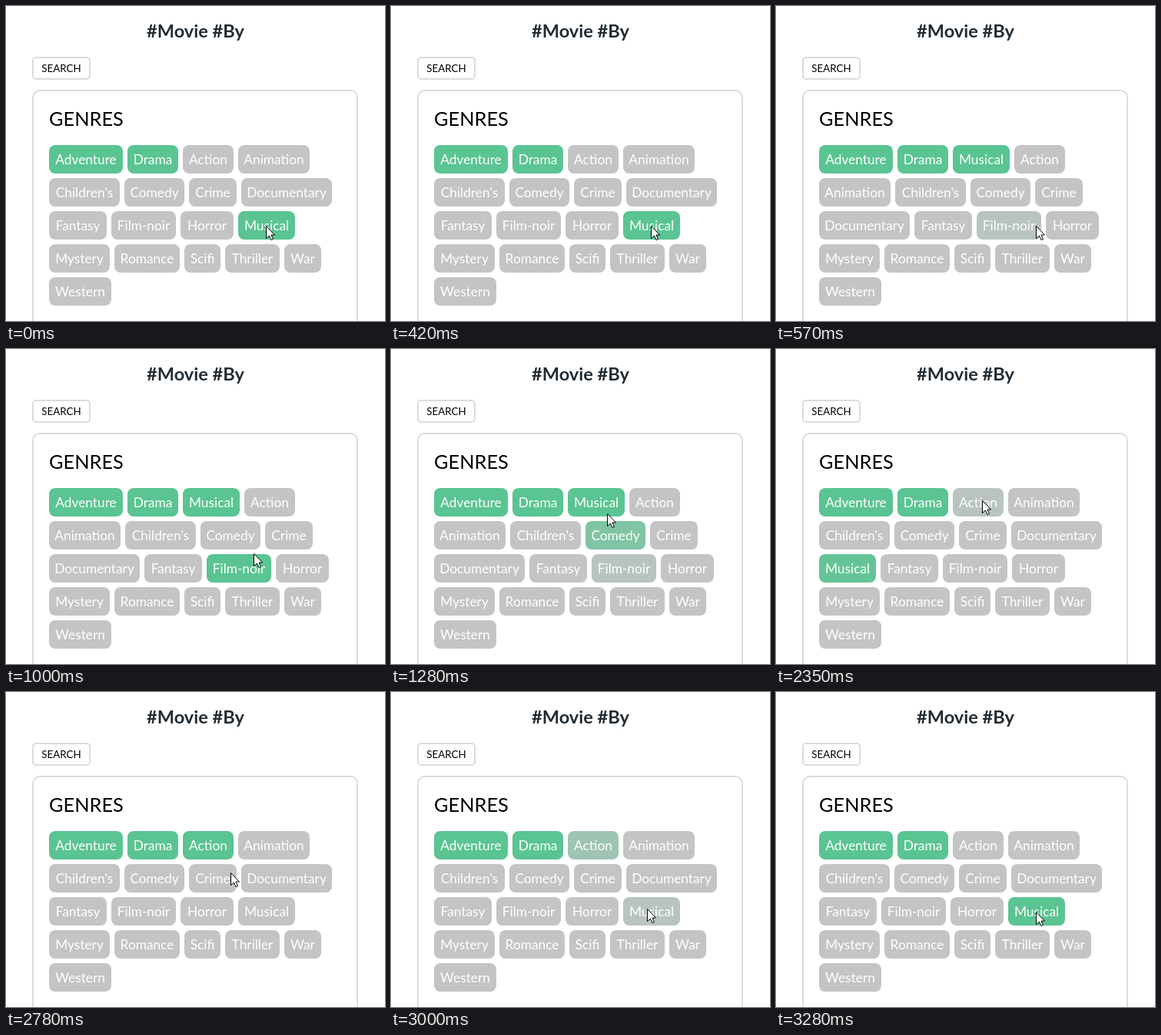
An HTML page with a canvas that plays this animation: 493 px wide and 410 px high, repeating every 3360 ms.

```html
<!DOCTYPE html>
<html lang="en">
<head>
<meta charset="utf-8">
<title>Genre picker</title>
<style>
  html, body { margin: 0; width: 100%; height: 100%; overflow: hidden; background: #fff; }
  canvas { display: block; }
</style>
</head>
<body>
<canvas id="stage" width="493" height="410"></canvas>
<script>
const ctx = document.getElementById('stage').getContext('2d');
const LOOP = 3360, TICKS = 47, STEP = 71.5;
const FAMILY = 'Lato, "Open Sans", sans-serif';
const GREY = [196, 196, 196], GREEN = [90, 196, 146];
const PAD = 8, GAP = 6, LEFT = 56, RIGHT = 437, TOP = 181, HEIGHT = 37;
const FADE = 0.2; // share of the hover fade per tick

// Ticks at which Musical is picked, dropped, and sorted back into place.
const PICK = 8, DROP = 33, SORT = 34;
const CLICKS = [5, 28];
const HOME = [338, 286], AWAY = [268, 197];

// Chip widths by label, in alphabetical order after the chosen ones.
const WIDTH = {
  Adventure: 96, Drama: 66,
  Action: 66, Animation: 93, "Children's": 92, Comedy: 78, Crime: 62, Documentary: 118,
  Fantasy: 75, 'Film-noir': 84, Horror: 69, Musical: 74, Mystery: 79, Romance: 85,
  Scifi: 47, Thriller: 71, War: 48, Western: 81
};
const NAMES = Object.keys(WIDTH);

const clamp = v => Math.min(1, Math.max(0, v));
const smooth = v => v * v * (3 - 2 * v);
const font = (size, weight = 400) => `${weight} ${size}px ${FAMILY}`;

// Font size at which the labels together take the given width.
function fitSize(labels, width, weight) {
  ctx.font = font(100, weight);
  return 100 * width / labels.reduce((sum, s) => sum + ctx.measureText(s).width, 0);
}

const chipSize = fitSize(NAMES,
  NAMES.reduce((sum, name) => sum + WIDTH[name] - 2 * PAD, 0));
const titleSize = fitSize(['#Movie #By'], 127, 700);
const headSize = fitSize(['GENRES'], 96.8);

// Eased move between two points, bowed sideways.
function glide([x0, y0], [x1, y1], progress, bow) {
  const e = smooth(clamp(progress)), b = bow * e * (1 - e);
  const dx = x1 - x0, dy = y1 - y0;
  return [Math.round(x0 + dx * e - dy * b), Math.round(y0 + dy * e + dx * b)];
}

function pointerAt(k) {
  return k < 30 ? glide(HOME, AWAY, (k - 11) / 9.7, 0)
                : glide(AWAY, HOME, (k - 36) / 7, 0.15);
}

const isChosen = (name, k) =>
  name === 'Adventure' || name === 'Drama' ||
  (name === 'Musical' && k >= PICK && k < DROP);

function order(k) {
  const names = NAMES.filter(n => isChosen(n, k))
    .concat(NAMES.filter(n => !isChosen(n, k)));
  if (k >= DROP && k < SORT) {
    names.splice(names.indexOf('Musical'), 1);
    names.splice(names.indexOf('Fantasy'), 0, 'Musical');
  }
  return names;
}

function layout(k) {
  let x = LEFT, y = TOP;
  return order(k).map(name => {
    const w = WIDTH[name];
    if (x + w > RIGHT) {
      x = LEFT;
      y += HEIGHT + GAP;
    }
    const chip = { name, x, y, w };
    x += w + GAP;
    return chip;
  });
}

// Hover follows the pointer one tick late and fades in and out.
function buildTicks() {
  const fade = { Musical: 1 };
  return Array.from({ length: TICKS }, (_, k) => {
    const [px, py] = pointerAt(k - 1);
    return layout(k).map(chip => {
      const { name, x, y, w } = chip;
      const over = px >= x && px < x + w && py >= y && py < y + HEIGHT;
      const lit = over || isChosen(name, k);
      const start = fade[name] ?? (lit ? 1 : 0);
      fade[name] = clamp(start + (lit ? FADE : -FADE));
      return { ...chip, level: smooth(fade[name]) };
    });
  });
}
const ticks = buildTicks();

function roundBox(x, y, w, h, r) {
  ctx.beginPath();
  ctx.roundRect(x, y, w, h, r);
}

function text(str, x, y, size, color, align = 'center', weight = 400) {
  ctx.font = font(size, weight);
  ctx.textAlign = align;
  ctx.fillStyle = color;
  ctx.fillText(str, x, y);
}

function page() {
  ctx.fillStyle = '#fff';
  ctx.fillRect(0, 0, 493, 410);
  text('#Movie #By', 246.5, 41, titleSize, '#212b33', 'center', 700);
  ctx.strokeStyle = '#dcdcdc';
  ctx.lineWidth = 2;
  roundBox(35, 67, 74, 28, 4);
  ctx.stroke();
  text('SEARCH', 72, 86, 13.333, '#000');
  roundBox(35, 110, 422, 340, 9);
  ctx.stroke();
  text('GENRES', LEFT, 156, headSize, '#000', 'left');
}

function drawChip({ name, x, y, w, level }) {
  const rgb = GREY.map((c, i) => Math.round(c + (GREEN[i] - c) * level));
  ctx.fillStyle = `rgb(${rgb})`;
  roundBox(x, y, w, HEIGHT, 8);
  ctx.fill();
  text(name, x + w / 2, y + 25, chipSize, '#fff');
}

function drawPointer(k) {
  const [x, y] = pointerAt(k);
  if (CLICKS.includes(k)) {
    ctx.fillStyle = 'rgba(255,255,0,.47)';
    ctx.beginPath();
    ctx.arc(x, y, 12, 0, 2 * Math.PI);
    ctx.fill();
  }
  const arrow = [[0, 0], [0, 16], [4, 12.5], [6.5, 18], [9, 17], [6.5, 11.5], [11, 11.5]];
  ctx.beginPath();
  for (const [dx, dy] of arrow) ctx.lineTo(x + 0.5 + dx, y + 0.5 + dy);
  ctx.closePath();
  ctx.fillStyle = '#fff';
  ctx.fill();
  ctx.strokeStyle = '#000';
  ctx.lineWidth = 1;
  ctx.stroke();
}

const start = performance.now();
function loop() {
  const time = (performance.now() - start) % LOOP;
  const k = Math.floor((time + 10) / STEP) % TICKS;
  page();
  ticks[k].forEach(drawChip);
  drawPointer(k);
  requestAnimationFrame(loop);
}
loop();
</script>
</body>
</html>
```
